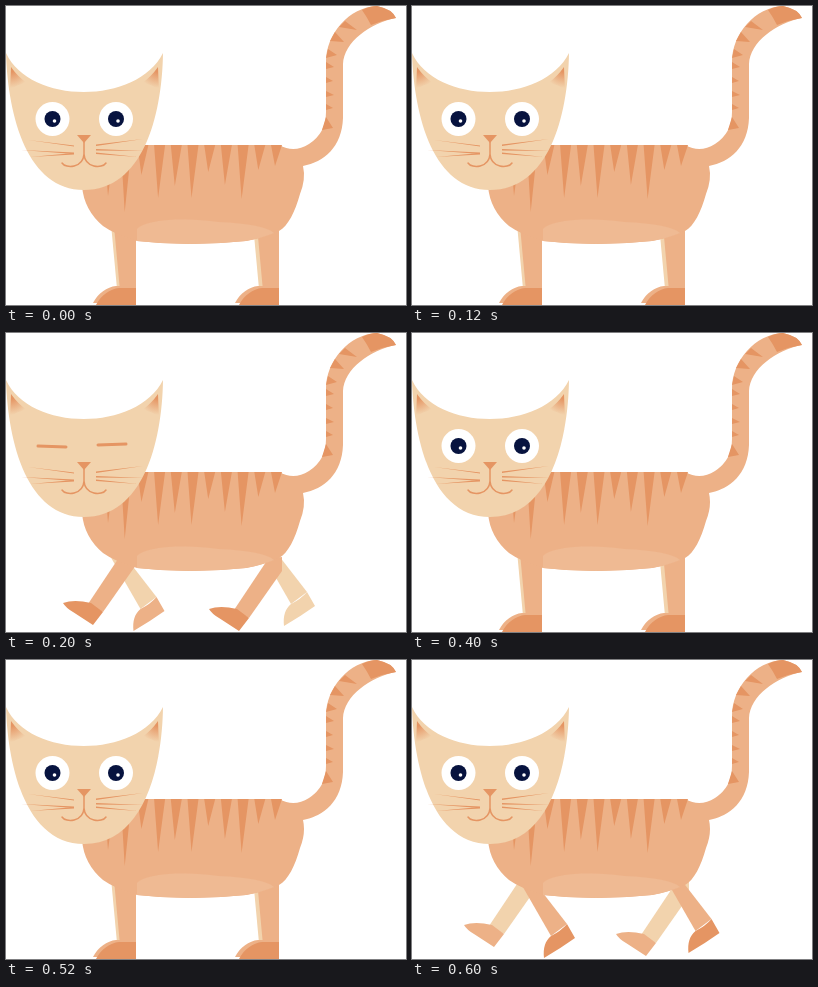
Animation, 400 px wide and 299 px high, one loop 800 ms. Source, as an HTML page:

```html
<!DOCTYPE html>
<html lang="en">
<head>
<meta charset="utf-8">
<title>Walking cat</title>
<style>
  html, body { margin: 0; width: 100%; height: 100%; overflow: hidden; background: #fff; }
  svg { display: block; width: 100vw; height: 100vh; }
  .coat { fill: #edb187; }
  .dark { fill: #e59563; }
  .pale { fill: #f2d3ad; }
  .line { fill: none; stroke: #e59563; stroke-width: 1.5; stroke-linecap: round; }
</style>
</head>
<body>
<svg viewBox="0 0 400 299">
  <defs>
    <radialGradient id="earFill" gradientUnits="userSpaceOnUse" cx="5" cy="62" r="20">
      <stop offset=".2" stop-color="#e59563"/><stop offset="1" stop-color="#f2d3ad"/>
    </radialGradient>
  </defs>

  <g id="farLegs"></g>
  <g id="nearLegs"></g>

  <path class="coat" d="M76 139H273C284 145 293 144 303 138Q320 127 320 106V56C320 28 343 1 371 0Q386 3 390 12C364 17 338 36 337 58V112C336 141 318 156 297 160Q300 173 294 188C289 206 282 220 273 225Q260 231 240 235Q183 241 131 235Q108 228 97 220Q78 204 76 180Z"/>
  <path fill="#efba93" d="M131 223C142 212 186 212 212 216Q258 218 268 227Q256 232 240 235Q183 241 131 235Z"/>
  <g class="dark">
    <path id="stripes"/>
    <path d="M356 4Q364 0 371 0Q386 3 390 12Q377 14 365 19Q361 11 356 4Z"/>
    <path d="M339 15L333 21 351 24ZM329 26L324 35 338 36ZM322 43L320 52 331 49ZM320 56V63L328 61ZM320 71V77L327 75ZM320 85V91L328 89ZM320 98V104L327 102ZM320 111L316 124 327 122Z"/>
  </g>

  <path class="pale" d="M0 47C24 99 131 99 157 47C156 112 136 184 78 184C22 184 2 112 0 47Z"/>
  <path id="ear" fill="url(#earFill)" d="M5 61Q12 71 21 77Q10 78 4 85Z"/>
  <use href="#ear" transform="matrix(-1 0 0 1 157 0)"/>

  <g id="open">
    <g id="eye">
      <circle cx="46.500" cy="113" r="17" fill="#fff"/>
      <circle cx="46.500" cy="113" r="8" fill="#07133f"/>
      <circle cx="48.500" cy="115" r="1.800" fill="#fff"/>
    </g>
    <use href="#eye" x="63.500"/>
  </g>
  <path id="shut" class="line" style="stroke-width:3" d="M32 113L60 114M92 112L120 111"/>

  <path class="dark" d="M71 129H85L78 137Z"/>
  <path class="line" d="M78 136V148C77 162 60 163 56 157M78 148C79 162 96 163 100 157"/>
  <path class="dark" d="M22 134L68 140.500 68 139.500ZM15 144L68 148 68 146.500ZM24 151L68 148.500 68 147ZM137 133L90 138.500 90 140ZM138 145L90 143 90 144.500ZM132 151L90 146.500 90 148Z"/>
</svg>
<script>
const $ = id => document.getElementById(id);

const tips = [190, 206, 169, 192, 180, 192, 166, 179, 193, 164, 160];
$('stripes').setAttribute('d', tips.map((y, i) => {
  const x = 102 + i * 16.700;
  return `M${x - 4} 139H${x + 7}L${x} ${y}Z`;
}).join(''));

// Each pose: [leg, paw], placed for the near front leg
const poses = {
  stand: ['M108 220L130 222V285H114Z', 'M90 299C95 289 104 283 113 282H130V299Z'],
  back: ['M116 220L130 218V232L97 279 82 271Z', 'M57 270Q68 266 85 270L97 279 87 292 67 279Q60 275 57 270Z'],
  ahead: ['M108 222L124 224 155 264 139 276Z', 'M132 298C131 288 133 281 139 276Q149 271 155 264L163 278Q149 288 132 298Z']
};

function leg(pose, x, y, legClass, pawClass) {
  const [shaft, paw] = poses[pose];
  return `<g transform="translate(${x} ${y})"><path class="${legClass}" d="${shaft}"/>` +
    `<path class="${pawClass}" d="${paw}"/></g>`;
}

const near = (pose, rearX, rearY) =>
  leg(pose, 0, 0, 'coat', 'dark') + leg(pose, rearX, rearY, 'coat', 'dark');
const far = (pose, x, y, rearX, rearY, rearPaw) =>
  leg(pose, x, y, 'pale', 'coat') + leg(pose, rearX, rearY, 'pale', rearPaw);

const stand = { near: near('stand', 143, 0), far: far('stand', -3, -2, 139, -2, 'coat') };
const steps = [
  stand,
  { near: near('back', 146, 6), far: far('ahead', -4.500, 0, 146, -5, 'pale'), shut: true },
  stand,
  { near: near('ahead', 144.500, -5), far: far('back', -5, -5, 147, 4, 'coat') }
];

let shown = -1;
function draw(now) {
  const n = Math.floor(now % 800 / 200);
  if (n !== shown) {
    const step = steps[shown = n];
    $('nearLegs').innerHTML = step.near;
    $('farLegs').innerHTML = step.far;
    $('open').style.display = step.shut ? 'none' : '';
    $('shut').style.display = step.shut ? '' : 'none';
  }
}

const start = performance.now();
function tick() {
  draw(performance.now() - start);
  requestAnimationFrame(tick);
}
tick();
</script>
</body>
</html>
```
